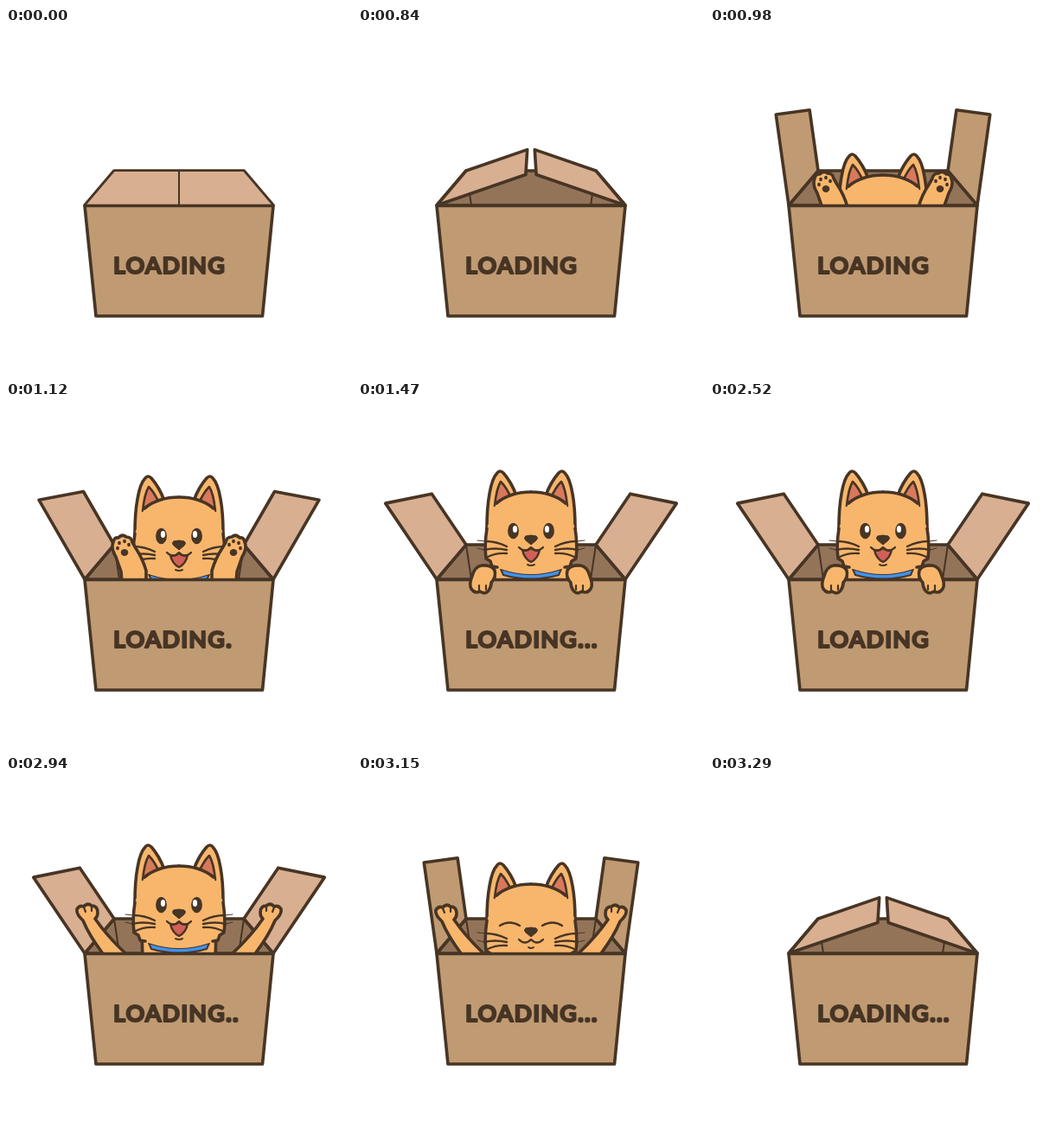
Animation, 400 px wide and 400 px high, one loop 3360 ms. Source, as an HTML page with a canvas:

```html
<!DOCTYPE html>
<html lang="en">
<head>
<meta charset="utf-8">
<title>Loading box</title>
<style>
  html, body { margin: 0; width: 100%; height: 100%; overflow: hidden; background: #fff; }
  canvas { display: block; }
</style>
</head>
<body>
<canvas id="stage" width="400" height="400"></canvas>
<script>
const ctx = document.getElementById('stage').getContext('2d');
const LOOP = 3360, STEP = 70, DOT_TIME = 210;
const INK = '#473525', FUR = '#f8b66c', PINK = '#d9795c', RED = '#d35f58', BLUE = '#3f92f5';
const CARD = '#c09a72', LIGHT = '#d9af91', INSIDE = '#947459';

// Each pose holds until the next: flap angle, head drop, face, arms, arm offset
const POSES = [
  { t: 0, flap: 0 },
  { t: 840, flap: 19 },
  { t: 910, flap: 60 },
  { t: 980, flap: 98, drop: 66, arms: 'palms' },
  { t: 1050, flap: 112, drop: 24, arms: 'palms', by: [0, -22] },
  { t: 1120, flap: 120, drop: 6, arms: 'palms', by: [3, -12] },
  { t: 1190, flap: 124, drop: 2, arms: 'rest' },
  { t: 1260, flap: 124, drop: 0, arms: 'rest' },
  { t: 1610, flap: 124, drop: 1, arms: 'rest' },
  { t: 1680, flap: 124, drop: 3, arms: 'rest', face: 'blink' },
  { t: 1750, flap: 124, drop: 4, arms: 'rest', face: 'blink' },
  { t: 2100, flap: 124, drop: 3, arms: 'rest', face: 'blink' },
  { t: 2240, flap: 124, drop: 1, arms: 'rest' },
  { t: 2310, flap: 124, drop: 0, arms: 'rest' },
  { t: 2590, flap: 124, drop: 0, arms: 'up', by: [18, 18] },
  { t: 2660, flap: 124, drop: 0, arms: 'up', by: [0, 4] },
  { t: 2730, flap: 124, drop: 0, arms: 'up', by: [-8, -1] },
  { t: 3150, flap: 98, drop: 21, arms: 'up', face: 'content' },
  { t: 3220, flap: 60, drop: 80 },
  { t: 3290, flap: 19 }
];

function shape(d, fill, width = 3.6) {
  const path = new Path2D(d);
  if (fill) { ctx.fillStyle = fill; ctx.fill(path); }
  if (width) { ctx.strokeStyle = INK; ctx.lineWidth = width; ctx.stroke(path); }
}

function oval(x, y, rx, ry, fill) {
  ctx.fillStyle = fill;
  ctx.beginPath();
  ctx.ellipse(x, y, rx, ry, 0, 0, Math.PI * 2);
  ctx.fill();
}

// Draws the left half, then its mirror image
function both(draw) {
  draw();
  ctx.save();
  ctx.translate(400, 0);
  ctx.scale(-1, 1);
  draw();
  ctx.restore();
}

function shifted(x, y, draw) {
  ctx.save();
  ctx.translate(x, y);
  draw();
  ctx.restore();
}

function drawInside() {
  shape('M91 205L125 165H275L309 205Z', INSIDE);
  both(() => shape('M125 165L131 205', null, 2));
}

function drawFlap(degrees) {
  const a = degrees * Math.PI / 180, c = Math.cos(a), s = Math.sin(a);
  const front = 106 + 3 * Math.max(0, c), back = 71 + 4 * Math.max(0, c);
  const vertical = degrees > 90 && degrees < 105;
  shape(`M91 205L${91 + front * c} ${205 - front * s}L${125 + back * c} ${165 - back * s}L125 165Z`,
    vertical ? CARD : LIGHT, degrees ? 3.6 : 2);
}

function drawFace(face) {
  both(() => {
    if (face) shape('M164 152Q175 145 187 152', null, 2.4);
    else {
      oval(179.5, 149, 6.4, 9.2, INK);
      oval(181.5, 147, 2.6, 4, '#fff');
    }
    shape('M147 161Q160 161 172 167M146 171Q158 168 172 171M150 179Q160 174 172 175', null, 2.4);
    shape('M138 160L147 161M138 169L146 171', null, 1);
  });
  const content = face === 'content';
  if (!content) shape('M190 171Q196 173 200 169Q204 173 210 171Q208 181 200 185Q192 181 190 171Z', RED, 2.4);
  shape('M186 168Q193 175 200 168Q207 175 214 168', null, 2.4);
  shape(content ? 'M197 177Q200 179 203 177' : 'M196 188Q200 190 204 188', null, 2);
  shape('M194 155Q200 153 206 155Q209 157 206 160L200 165L194 160Q191 157 194 155Z', INK, 1);
}

function drawCat(face) {
  shape('M157 180L158 212H242L243 180Z', FUR);
  shape('M165 193Q200 205 235 193L232 200Q200 209 168 200Z', BLUE, 2);
  both(() => {
    // The outer edge of the ear runs on into the cheek
    shape('M149 146Q149 122 152 106Q155 88 161 82Q164 78 168 82Q177 92 183 108', FUR);
    shape('M158 120Q160 100 165 92Q172 99 177 111Z', PINK, 2.6);
    shape('M200 104C184 104 171 108 160 117L149 146Q146 166 148 181L153 184L155 190L165 193Q183 199 200 199Z', FUR, 0);
    shape('M200 104C184 104 171 108 160 117M149 146Q146 166 148 181L153 184L155 190L161 191', null);
  });
  drawFace(face);
}

function drawPalm() {
  shape('M132 235L130 208L124 191Q118 181 121 174Q122 168 127 169Q131 164 136 168Q142 168 143 174L147 181Q155 193 159 207V235Z', FUR);
  oval(134, 186, 4.3, 4, INK);
  [[126, 181], [128, 175], [134, 173], [139, 177]].forEach(([x, y]) => oval(x, y, 1.9, 2.3, INK));
}

function drawRaisedArm() {
  shape('M119 235V205Q104 185 97 168Q89 161 90 155Q93 150 98 152Q102 147 107 151Q114 151 114 159Q114 164 111 166Q124 185 145 205V235Z', FUR);
  shape('M98 153L100 158M107 152V157', null, 2.2);
}

function drawRestingPaw() {
  shape('M158 195Q155 188 143 189Q135 190 132 201Q128 211 131 216Q135 222 141 219Q147 223 151 218Q154 214 154 209Q160 202 158 195Z', FUR);
  shape('M140 212V218M148 212V217', null, 2.2);
}

function drawFront(dots) {
  shape('M91 205.5H309L296.5 333H104Z', CARD);
  ctx.font = 'bold 27px Lato, sans-serif';
  ctx.letterSpacing = '1.1px';
  ctx.fillStyle = ctx.strokeStyle = INK;
  ctx.lineWidth = 1.9;
  ctx.fillText('LOADING', 124, 284);
  ctx.strokeText('LOADING', 124, 284);
  for (let i = 0; i < dots; i++) oval(257.5 + i * 7.8, 282, 3.2, 3.2, INK);
}

function render(now) {
  const t = Math.floor(now % LOOP / STEP) * STEP;
  const { flap, drop, face, arms, by = [0, 0] } = POSES.findLast(p => p.t <= t);
  ctx.clearRect(0, 0, 400, 400);
  ctx.lineJoin = ctx.lineCap = 'round';
  drawInside();
  both(() => drawFlap(flap));

  // Only what rises above the front edge is visible
  ctx.save();
  ctx.beginPath();
  ctx.rect(0, 0, 400, 206);
  ctx.clip();
  if (drop !== undefined) shifted(0, drop, () => drawCat(face));
  const arm = { palms: drawPalm, up: drawRaisedArm }[arms];
  if (arm) both(() => shifted(...by, arm));
  ctx.restore();

  drawFront(Math.floor(t / DOT_TIME) % 4);
  if (arms === 'rest') both(drawRestingPaw);
}

const start = performance.now();
(function tick() {
  render(performance.now() - start);
  requestAnimationFrame(tick);
})();
</script>
</body>
</html>
```
